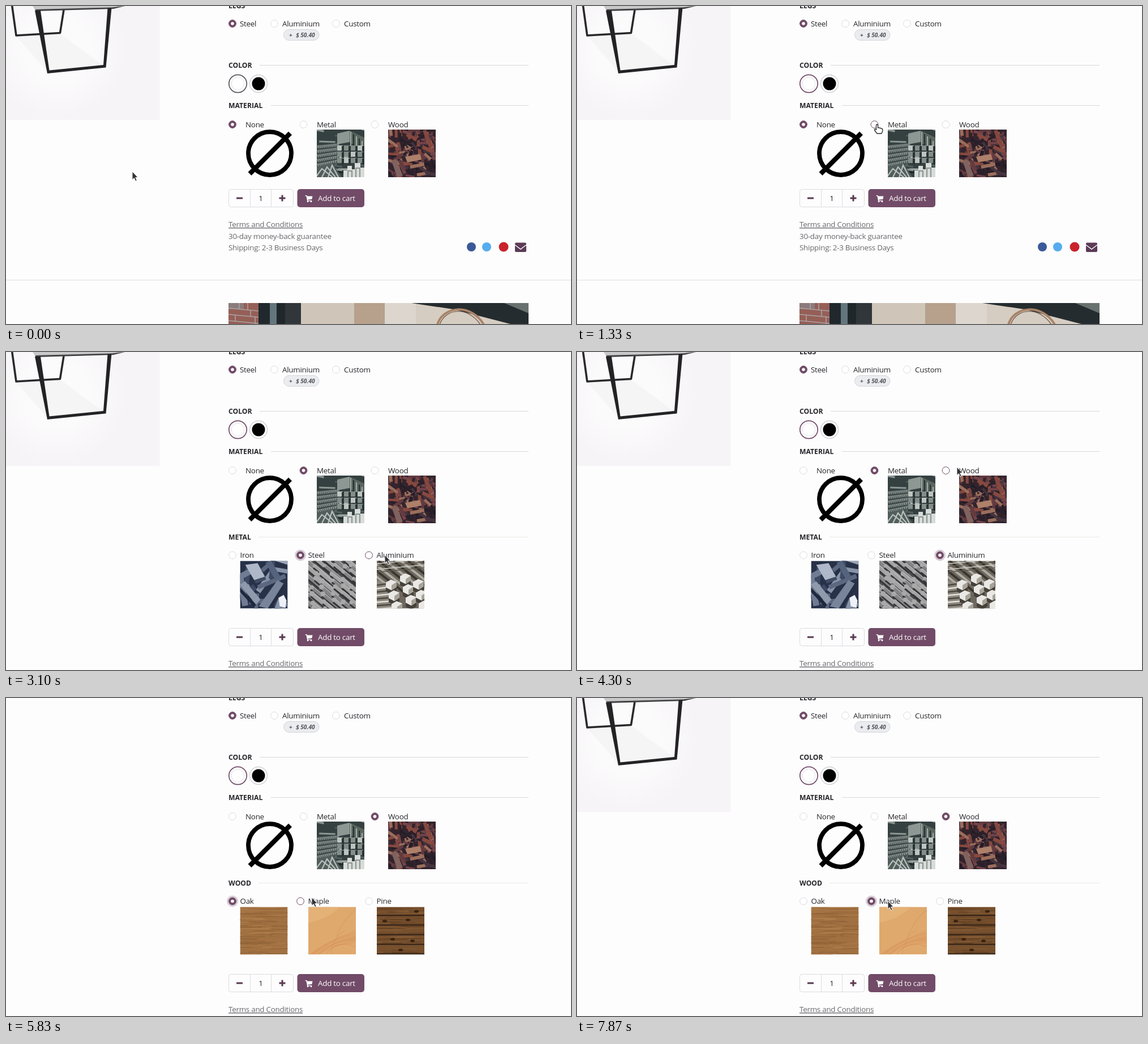
An HTML page for the animation above (7940 ms loop, 998x561 px).

```html
<!DOCTYPE html>
<html lang="en">
<head>
<meta charset="utf-8">
<title>Product options</title>
<style>
html, body { margin: 0; width: 100%; height: 100%; overflow: hidden; background: #fdfdfd; }
#stage { display: block; width: 998px; height: 561px; }
text { font: 13.4px "Open Sans", "Noto Sans", sans-serif; letter-spacing: -.26px; fill: #26262b; }
.head { font-weight: 700; font-size: 12.2px; letter-spacing: 0; }
.badge { font: italic 700 10.2px "Open Sans", "Noto Sans", sans-serif; letter-spacing: 0; fill: #55555c; }
.muted { fill: #68686d; }
</style>
</head>
<body>
<svg id="stage" viewBox="0 0 998 561" xmlns="http://www.w3.org/2000/svg"></svg>
<script>
const LOOP = 7940, PLUM = '#714b67', FAINT = '#dcdce3';
const stage = document.getElementById('stage');

const rect = (x, y, w, h, fill, extra = '') =>
  `<rect x="${x}" y="${y}" width="${w}" height="${h}" fill="${fill}" ${extra}/>`;
const circle = (x, y, r, fill, extra = '') => `<circle cx="${x}" cy="${y}" r="${r}" fill="${fill}" ${extra}/>`;
const path = (d, fill, extra = '') => `<path d="${d}" fill="${fill}" ${extra}/>`;
const line = (d, color, width = 1, extra = '') => path(d, 'none', `stroke="${color}" stroke-width="${width}" ${extra}`);
const text = (x, y, s, cls = '', extra = '') => `<text x="${x}" y="${y}" class="${cls}" ${extra}>${s}</text>`;
const heading = (y, s, ruleX, rule = '#d8d8da') => text(393, y + 4.5, s, 'head') + line(`M${ruleX} ${y + .5}H923`, rule);
const repeat = (n, fn) => Array.from({ length: n }, (_, i) => fn(i)).join('');
const photo = (x, y, body) => `<svg x="${x}" y="${y}" width="84" height="84">${body}</svg>`;

function random(seed) {
  return () => (seed = (seed * 16807) % 2147483647) / 2147483647;
}

// Loose bars lying around a main direction.
function bars(seed, count, colors, w, h, angle, spread) {
  const r = random(seed);
  r();
  return repeat(count, i => {
    const x = r() * 84, y = r() * 84, turn = angle + (r() - .5) * spread;
    const len = w * (.6 + r() * .7), thick = h * (.6 + r() * .7);
    return rect(-len / 2, -thick / 2, len, thick, colors[i % colors.length],
      `transform="translate(${x} ${y}) rotate(${turn})"`);
  });
}

function metalStock() {
  return rect(0, 0, 84, 84, '#354040') +
    bars(91, 26, ['#53605f', '#8b9693', '#1f2929', '#b0b8b4'], 26, 3, 8, 24) +
    path('M0 27L38 23V60L0 66Z', '#414c4b') +
    repeat(5, i => line(`M0 ${31 + i * 8}L40 ${27 + i * 7}`, '#8f9a96', 4.5) +
      line(`M0 ${32 + i * 8}L40 ${28 + i * 7}`, '#3c4746', 4.5, 'stroke-dasharray="1.5 2"')) +
    path('M36 7L58 2V22L36 26Z', '#8d9794') + path('M58 2L84 14V42L58 22Z', '#59665f') +
    repeat(5, i => line(`M${60 + i * 5} ${4 + i * 4}V${30 + i * 3}`, i % 2 ? '#252f2f' : '#a2aca8', 2)) +
    repeat(12, i => {
      const x = 36 + i % 4 * 12, y = 28 + Math.floor(i / 4) * 11;
      return rect(x, y, 10, 9, i % 3 ? '#838e8a' : '#bdc4c0') + rect(x + 8, y + 1, 4, 10, '#2a3433');
    }) +
    path('M0 84V66L27 59L44 84Z', '#525e5c') +
    repeat(3, i => line(`M${i * 11 - 2} 84L${9 + i * 9} ${69 - i * 3}L${28 + i * 5} 84`, '#b9c1bd', 2.2)) +
    path('M47 84V72H54V64H62V70H67V59H77V67H84V84Z', '#d8dcd8') +
    line('M55 84V73H62V84M69 84V68H76V84', '#8a9490', 2);
}

function woodStock() {
  return rect(0, 0, 84, 84, '#33242d') +
    bars(47, 105, ['#623b40', '#87493f', '#241c28', '#734349', '#9b6e5c', '#45343f', '#2a2029'], 20, 5, 35, 150) +
    path('M30 48L56 43L59 53L34 58Z', '#ad806a') +
    path('M6 55L14 52L26 81L16 84Z', '#80635f') +
    path('M61 2L67 0L79 30L73 34Z', '#85473e');
}

function iron() {
  return rect(0, 0, 84, 84, '#273148') +
    bars(33, 15, ['#5b6880', '#8793a8', '#3e4a64', '#6f7c93'], 42, 9, -45, 110) +
    path('M9 7L31 4L44 28L25 34Z', '#aeb8c8') + path('M25 34L44 28L46 33L28 40Z', '#404c64') +
    path('M33 80L66 34L77 40L49 84Z', '#78849a') + path('M49 84L77 40L81 44L56 84Z', '#252e43') +
    path('M0 42L9 36L36 68L28 77Z', '#8f9bad') + path('M0 47L28 77L25 82L0 55Z', '#1f283c') +
    path('M45 3L55 0L72 29L62 34Z', '#56637c') + path('M62 0H84V7Z', '#99a5b6') +
    path('M68 65L77 60L82 70L80 83L70 80Z', '#eef1f7');
}

function steel() {
  const r = random(58);
  r();
  return rect(0, 0, 84, 84, '#504f51') + repeat(46, i => {
    const x = i % 6 * 17 - 12 + r() * 9, y = Math.floor(i / 6) * 13 - 10 + r() * 7, size = 2.8 + r() * 2;
    const rod = (dx, dy, color, width) => line(`M${x + dx} ${y + dy}l30 25`, color, width);
    return rod(-2, 4, '#363538', size) + rod(0, 0, r() > .5 ? '#858486' : '#a3a2a3', size * 1.7) +
      rod(2, -1.5, '#c9c8c8', 1) + circle(x, y, size, '#aaa9a9');
  });
}

function aluminium() {
  const column = (x, y, count) => repeat(count, i => {
    const px = x + i * 5, py = y + i * 19;
    return path(`M${px} ${py}l9 -5 10 4v9l-9 6 -10 -5Z`, '#e9e8e4') +
      path(`M${px} ${py + 9}l10 5 9 -6v7l-9 6 -10 -5Z`, '#45413a') +
      path(`M${px + 10} ${py + 5}l9 -6v9l-9 6Z`, '#a7a399');
  });
  return rect(0, 0, 84, 84, '#6d685f') +
    repeat(14, i => line(`M${i * 13 - 75} 0L${i * 13 - 5} 55`, i % 2 ? '#b0aca2' : '#39352d', 4)) +
    repeat(5, i => line(`M0 ${i * 5}L84 ${i * 5 - 8}`, i % 2 ? '#d0cec7' : '#5d584e', 1.3)) +
    path('M0 34L18 41L39 84H0Z', '#8c887e') +
    repeat(8, i => line(`M0 ${43 + i * 6}L${20 + i * 3} ${40 + i * 6}`, i % 2 ? '#e4e2dc' : '#4b473f', 2.5)) +
    column(16, 38, 3) + column(41, 27, 3) + column(64, 37, 3);
}

function grain(base, colors, seed, count) {
  const r = random(seed);
  r();
  return rect(0, 0, 84, 84, base) + repeat(count, i => {
    const x = r() * 84 - 25, y = r() * 84;
    return line(`M${x} ${y}q20 ${r() * 3 - 1.5} ${25 + r() * 45} 0`, colors[i % colors.length], .6 + r(), 'opacity=".55"');
  });
}

const oak = () => grain('#a27142', ['#82582f', '#b68750', '#926337'], 17, 95);

function maple() {
  return rect(0, 0, 84, 84, '#dfa86c') +
    path('M0 0H55Q38 20 0 28Z', '#e4b277') +
    path('M0 84Q33 57 84 45V64Q48 66 20 84Z', '#d99a60', 'opacity=".6"') +
    repeat(7, i => line(`M${i * 6} 84Q${36 + i * 3} 58 84 ${35 + i * 7}`, i % 2 ? '#d08d56' : '#e8b780', 1, 'opacity=".45"')) +
    line('M40 84Q45 49 67 42M84 5Q57 26 46 64', '#d0945b', 1.5, 'opacity=".45"');
}

function pine() {
  return grain('#77502e', ['#503319', '#986b3d', '#633f22'], 29, 85) +
    repeat(5, i => line(`M0 ${i * 17 + 15}H84`, '#2e2017', 1.8)) +
    [[14, 25], [55, 23], [70, 8], [28, 57], [63, 60], [42, 76]].map(([x, y]) =>
      `<ellipse cx="${x}" cy="${y}" rx="4" ry="2.3" fill="#38220f"/>`).join('');
}

function table() {
  return rect(0, 0, 271.5, 201, 'url(#panel)') +
    path('M18 53L95 48L174 107L75 118Z', '#e9e8e9', 'opacity=".35"') +
    line('M10.5 -2L18 52L95.5 47.5L102 7', '#29292b', 3.6, 'stroke-linejoin="round"') +
    path('M48 0H210L190 5L53 9Z', '#414144') +
    path('M47 0H208L187 2.5L51 6Z', '#c9c8c8') +
    path('M51 8L61 8L76.5 113.5L172 104L179.5 4L186.5 3L176.5 108.5L73 119Z', '#232325');
}

function banner() {
  const mortar = repeat(3, i => line(`M393 ${533 + i * 11}L446 ${538 + i * 11}`, '#aaa3a2', 1.6)) +
    line('M412 524V535M432 536V547M405 546V557M427 524V536M440 548V561', '#aaa3a2', 1.6);
  return rect(393, 524, 530, 37, '#d6cdc2') +
    rect(393, 524, 54, 37, '#955f57') + rect(393, 524, 27, 11, '#8b7c7b') + mortar +
    rect(446, 524, 20, 37, '#20282d') + rect(466, 524, 12, 37, '#64767d') +
    rect(478, 524, 15, 37, '#20272b') + rect(493, 524, 28, 37, '#30363a') +
    rect(521, 524, 94, 37, '#cfc6b9') + rect(615, 524, 54, 37, '#b7a18c') +
    rect(669, 524, 55, 37, '#dcd6ce') +
    path('M716 524H923V561H891L790 535Z', '#252c2f') +
    path('M880 524H923V542Z', '#69716f') +
    line('M762 562C772 529 821 524 844 562', '#a98468', 4) +
    line('M766 562C777 532 816 530 838 562', '#68503f', 1.2);
}

function purchase() {
  return rect(393.5, 323.5, 114, 31, '#fdfdfd', `rx="4" stroke="${FAINT}"`) +
    line('M431.5 324V354M468.5 324V354', FAINT) +
    line('M407 339H418M482.5 339H493.5M488 333.5V344.5', '#593951', 3) +
    text(450, 344, '1', '', 'text-anchor="middle"') +
    rect(514.5, 323, 118.5, 32, PLUM, 'rx="5"') +
    path('M528.5 334h3l.6 1.5h9.4l-1.2 5.5-7 .8.3 1.2h6.6v1.3h-8l-1.9-9h-1.8Z', '#fff') +
    circle(533, 345, 1.3, '#fff') + circle(539, 345, 1.3, '#fff') +
    text(551, 344, 'Add to cart', '', 'style="fill:#fff"') +
    text(393, 390, 'Terms and Conditions', 'muted', 'text-decoration="underline"') +
    text(393, 410.5, '30-day money-back guarantee', 'muted') +
    text(393, 430.5, 'Shipping: 2-3 Business Days', 'muted') +
    circle(822, 425, 8, '#3b5998') + circle(849, 425, 8, '#55acee') + circle(879, 425, 8.5, '#c8232c') +
    rect(899, 417.5, 20, 16.5, '#5c3b57', 'rx="2"') +
    line('M899 421.5L909 429L919 421.5', '#fdfdfd', 1.4) +
    line('M0 483.5H998', '#dedede') + banner();
}

// Each option: radio position, label position and the right edge of its hover area.
const option = (id, x, y, label, labelX, endX) => ({ id, x, y, label, labelX, endX });
const fixed = [
  option('legSteel', 400, 31, 'Steel', 413, 445),
  option('legAluminium', 474, 31, 'Aluminium', 488, 553),
  option('legCustom', 583, 31, 'Custom', 597, 643),
  option('none', 400, 209, 'None', 423, 456),
  option('metal', 525.5, 209, 'Metal', 549, 585),
  option('wood', 651.5, 209, 'Wood', 675, 711)
];
const trio = names => names.map((name, i) => {
  const x = [400, 520, 641][i];
  return option(name.toLowerCase(), x, 358.5, name, x + 13.5, x + 79);
});
const groups = {
  metal: trio(['Iron', 'Steel', 'Aluminium']),
  wood: trio(['Oak', 'Maple', 'Pine'])
};
const options = [...fixed, ...groups.metal, ...groups.wood];

const drawOption = o =>
  `<g id="${o.id}">${circle(o.x, o.y, 10, '#d9cdd6')}${circle(o.x, o.y, 6.4, '#fff')}${circle(o.x, o.y, 2.8, '#fff')}</g>` +
  text(o.labelX, o.y + 4.6, o.label);

const drawGroup = (id, title, photos) =>
  `<g id="${id}Group">${heading(326, title, 446, '#e8e8e4')}${groups[id].map(drawOption).join('')}` +
  photos.map((draw, i) => photo([413.5, 534, 655][i], 368.5, draw())).join('') + '</g>';

stage.innerHTML = `<defs><radialGradient id="panel" gradientUnits="userSpaceOnUse" cx="90" cy="75" r="190">
  <stop offset=".3" stop-color="#fcfbfc"/><stop offset=".65" stop-color="#f6f4f6"/></radialGradient></defs>` +
  rect(0, 0, 998, 561, '#fdfdfd') +
  `<g id="table">${table()}</g>` +
  text(393, 3.5, 'LEGS', 'head') +
  rect(490.5, 41.5, 62.5, 19, '#ebecef', 'rx="9.5" stroke="#d4d5da"') +
  text(500, 54.5, '+', 'badge') + text(512, 54.5, '$ 50.40', 'badge') +
  heading(104, 'COLOR', 448) +
  circle(409.5, 137, 15.7, '#fff', 'id="swatch" stroke-width="1.7"') +
  circle(409.5, 137, 11.2, '#fff', 'stroke="#e3e3e8"') +
  circle(446, 137, 15.5, '#fff', 'stroke="#d2d1d9" stroke-width="1.4"') + circle(446, 137, 11.5, '#000') +
  heading(175, 'MATERIAL', 468) + fixed.map(drawOption).join('') +
  circle(466, 260, 38, 'none', 'stroke="#000" stroke-width="7.8"') + line('M430.5 296L502 224.5', '#000', 8.4) +
  photo(549, 218, metalStock()) + photo(675, 218, woodStock()) +
  drawGroup('metal', 'METAL', [iron, steel, aluminium]) +
  drawGroup('wood', 'WOOD', [oak, maple, pine]) +
  `<g id="purchase">${purchase()}</g>` +
  `<g id="arrow">${path('M0 0V14.5L3.3 11.5L5.8 17L8.2 15.9L5.8 10.5H10Z', '#333336', 'stroke="#fff" stroke-width=".9"')}</g>` +
  `<g id="hand">${path('M-1.5 1Q0 -1 1.5 1V6Q4 4.8 4.7 6.6Q7 5.5 7.4 7.5Q9.8 7 9.8 9V11.5L8 16H0L-4.5 10Q-5 7.5 -2.5 8.5L-1.5 9.5Z',
    '#fff', 'stroke="#29292c" stroke-width="1.3" stroke-linejoin="round"')}</g>`;

const $ = id => document.getElementById(id);
const show = (id, on) => $(id).setAttribute('display', on ? 'inline' : 'none');

const route = [
  [0, 223, 292], [250, 223, 292], [1200, 530, 209], [1750, 530, 209], [2300, 536, 342],
  [2450, 537, 356], [2680, 537, 357], [3100, 669, 358], [3700, 671, 358], [4300, 671, 203],
  [4650, 671, 205], [5250, 413, 355], [5500, 413, 355], [5830, 540, 352], [6000, 549, 358], [LOOP, 549, 358]
];
const clicks = [[1650, 'metal'], [2600, 'steel'], [3500, 'aluminium'], [4500, 'wood'], [5430, 'oak'], [6100, 'maple']];

function cursorAt(t) {
  const i = Math.max(1, route.findIndex(stop => stop[0] > t));
  const [t0, x0, y0] = route[i - 1], [t1, x1, y1] = route[i];
  const p = (t - t0) / (t1 - t0), e = p * p * (3 - 2 * p);
  return [x0 + (x1 - x0) * e, y0 + (y1 - y0) * e];
}

function render(t) {
  const [cx, cy] = cursorAt(t);
  const done = clicks.filter(([at]) => at <= t).map(([, id]) => id);
  const focused = done[done.length - 1];
  const material = done.includes('wood') ? 'wood' : done.includes('metal') ? 'metal' : 'none';
  const selected = ['legSteel', material, focused];
  const active = [...fixed, ...(groups[material] || [])];
  let overRadio = false;

  for (const o of options) {
    const checked = selected.includes(o.id);
    const hover = active.includes(o) && cx > o.x - 8 && cx < o.endX && Math.abs(cy - o.y) < 9;
    const [halo, ring, dot] = $(o.id).children;
    if (hover && Math.hypot(cx - o.x, cy - o.y) < 7) overRadio = true;
    halo.setAttribute('opacity', o.id === focused ? 1 : 0);
    ring.setAttribute('fill', checked ? PLUM : '#fff');
    ring.setAttribute('stroke', checked || hover ? PLUM : FAINT);
    dot.setAttribute('opacity', checked ? 1 : 0);
  }

  show('metalGroup', material === 'metal');
  show('woodGroup', material === 'wood');
  $('purchase').setAttribute('transform', `translate(0 ${material === 'none' ? 0 : 164})`);
  $('swatch').setAttribute('stroke', t < 800 ? '#59545c' : PLUM);
  show('table', t < 5560 || t >= 6020);
  show('arrow', !overRadio);
  show('hand', overRadio);
  for (const id of ['arrow', 'hand']) $(id).setAttribute('transform', `translate(${cx} ${cy})`);
}

const start = performance.now();
function tick() {
  render((performance.now() - start) % LOOP);
  requestAnimationFrame(tick);
}
tick();
</script>
</body>
</html>
```
